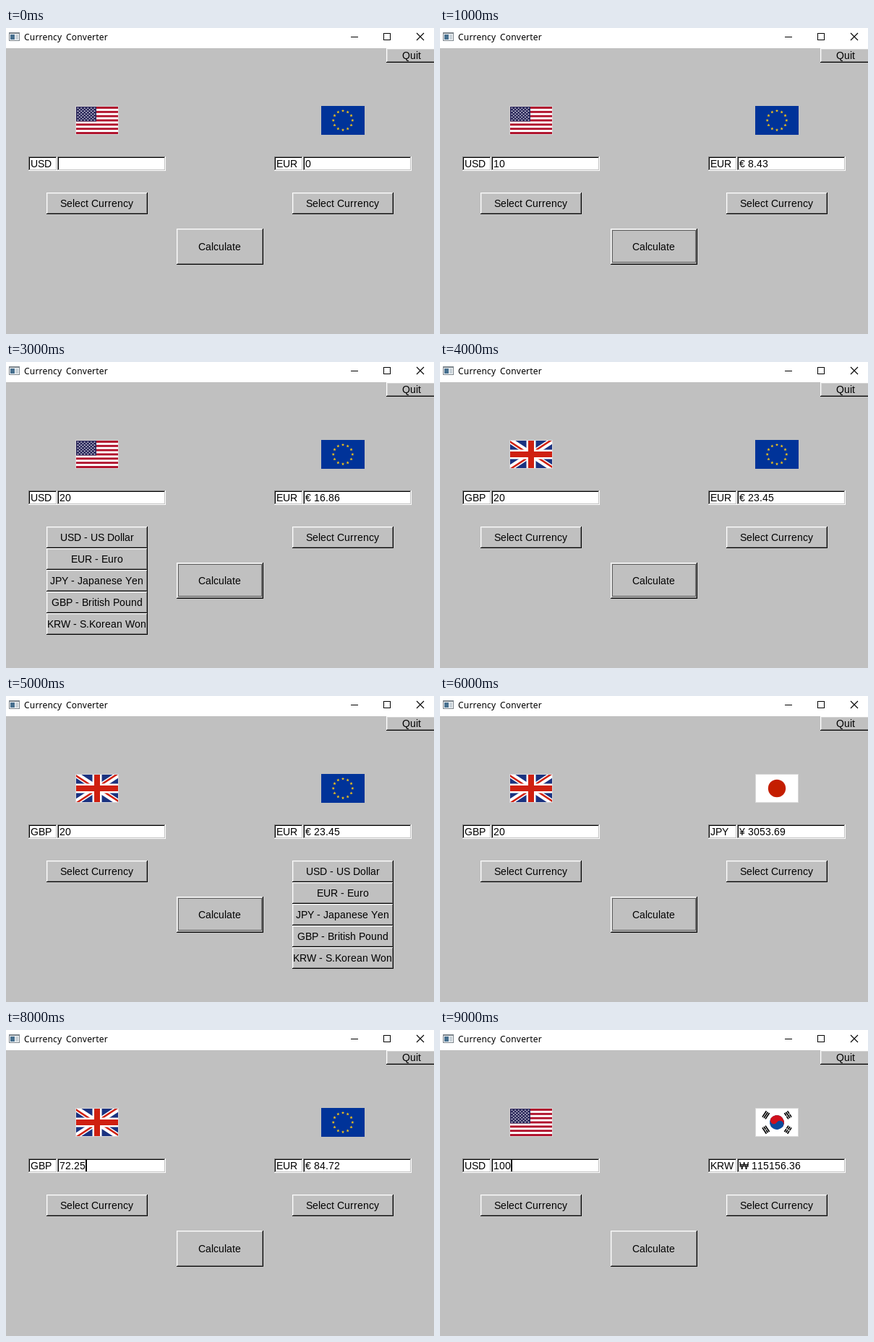
Write an HTML page with a canvas that moves like this. It is 592 by 424 pixels and loops after 10000 ms.

```html
<!DOCTYPE html>
<html lang="en">
<head>
<meta charset="utf-8">
<title>Currency Converter</title>
<style>
html, body { margin: 0; width: 100%; height: 100%; overflow: hidden; background: #c0c0c0; }
canvas { display: block; }
</style>
</head>
<body>
<canvas id="stage" width="592" height="424"></canvas>
<script>
const ctx = document.getElementById('stage').getContext('2d');
const UI_FONT = '14px "Liberation Sans", Arial, sans-serif';
const MENU = ['USD - US Dollar', 'EUR - Euro', 'JPY - Japanese Yen', 'GBP - British Pound', 'KRW - S.Korean Won'];
const STEP = 1000;

// One state per second.
const STATES = [
  { from: 'USD', amount: '', to: 'EUR', result: '0' },
  { from: 'USD', amount: '10', to: 'EUR', result: '€ 8.43', focus: true },
  { from: 'USD', amount: '20', to: 'EUR', result: '€ 16.86', focus: true },
  { from: 'USD', amount: '20', to: 'EUR', result: '€ 16.86', focus: true, menu: 'left' },
  { from: 'GBP', amount: '20', to: 'EUR', result: '€ 23.45', focus: true },
  { from: 'GBP', amount: '20', to: 'EUR', result: '€ 23.45', focus: true, menu: 'right' },
  { from: 'GBP', amount: '20', to: 'JPY', result: '¥ 3053.69', focus: true },
  { from: 'JPY', amount: '100', to: 'KRW', result: '₩ 1049.07', caret: true },
  { from: 'GBP', amount: '72.25', to: 'EUR', result: '€ 84.72', caret: true },
  { from: 'USD', amount: '100', to: 'KRW', result: '₩ 115156.36', caret: true }
];

function rect(x, y, w, h, color) {
  ctx.fillStyle = color;
  ctx.fillRect(x, y, w, h);
}

function disc(x, y, r, color, start = 0, end = Math.PI * 2) {
  ctx.fillStyle = color;
  ctx.beginPath();
  ctx.arc(x, y, r, start, end);
  ctx.fill();
}

function line(x1, y1, x2, y2, width, color) {
  ctx.strokeStyle = color;
  ctx.lineWidth = width;
  ctx.beginPath();
  ctx.moveTo(x1, y1);
  ctx.lineTo(x2, y2);
  ctx.stroke();
}

// Text advances by whole pixels per glyph, like classic desktop widgets.
const advance = ch => Math.round(ctx.measureText(ch).width);

function textWidth(str) {
  ctx.font = UI_FONT;
  return [...str].reduce((sum, ch) => sum + advance(ch), 0);
}

function label(str, x, y) {
  ctx.font = UI_FONT;
  ctx.fillStyle = '#000';
  for (const ch of str) {
    ctx.fillText(ch, x, y);
    x += advance(ch);
  }
  return x;
}

function bevel(x, y, w, h, light, dark) {
  rect(x, y, w, 1, light);
  rect(x, y, 1, h, light);
  rect(x, y + h - 1, w, 1, dark);
  rect(x + w - 1, y, 1, h, dark);
}

function button(str, x, y, w, h) {
  rect(x, y, w, h, '#c0c0c0');
  bevel(x + 1, y + 1, w - 2, h - 2, '#d4d4d4', '#808080');
  bevel(x, y, w, h, '#fff', '#000');
  label(str, Math.floor(x + (w - textWidth(str)) / 2), y + h / 2 + 5);
}

function field(str, x, w, caret) {
  rect(x, 178, w, 20, '#fff');
  bevel(x, 178, w, 20, '#808080', '#fff');
  bevel(x + 1, 179, w - 2, 18, '#000', '#c0c0c0');
  const end = label(str, x + 3, 193);
  if (caret) rect(end, 180, 2, 16, '#000');
}

// Flags are drawn around their centre, in a 60 by 40 box.
const FLAGS = {
  USD() {
    rect(-30, -20, 60, 40, '#d6d0d2');
    rect(-29, -19, 58, 38, '#fff');
    const h = 38 / 13;
    for (let i = 0; i < 13; i += 2) rect(-29, -19 + i * h, 58, h, '#b0122c');
    rect(-29, -19, 28, h * 7, '#2d2a5c');
    for (let row = 0; row < 9; row++) {
      for (let col = row % 2; col < 11; col += 2) {
        disc(-26.5 + col * 2.3, -17 + row * 2.07, 0.85, '#e4e4f0');
      }
    }
  },
  EUR() {
    rect(-30, -20, 60, 40, '#003399');
    for (let i = 0; i < 12; i++) {
      const a = i * Math.PI / 6;
      star(13.3 * Math.sin(a), -13.3 * Math.cos(a), 2.3, '#f5c518');
    }
  },
  GBP() {
    const w = 29, h = 19;
    rect(-30, -20, 60, 40, '#d4d4d8');
    ctx.beginPath();
    ctx.rect(-w, -h, w * 2, h * 2);
    ctx.clip();
    rect(-w, -h, w * 2, h * 2, '#1a3280');
    const cross = (width, color) => {
      line(-w, -h, w, h, width, color);
      line(-w, h, w, -h, width, color);
    };
    cross(8, '#fff');
    ctx.save();
    ctx.beginPath();
    for (const [x1, y1, x2, y2] of [[w, 0, w, h], [0, h, -w, h], [-w, 0, -w, -h], [0, -h, w, -h]]) {
      ctx.moveTo(0, 0);
      ctx.lineTo(x1, y1);
      ctx.lineTo(x2, y2);
      ctx.closePath();
    }
    ctx.clip();
    cross(5, '#cf2010');
    ctx.restore();
    rect(-w, -6.5, w * 2, 13, '#fff');
    rect(-6.5, -h, 13, h * 2, '#fff');
    rect(-w, -4, w * 2, 8, '#cf2010');
    rect(-4, -h, 8, h * 2, '#cf2010');
  },
  JPY() {
    rect(-30, -20, 60, 40, '#d8d8d8');
    rect(-29, -19, 58, 38, '#fff');
    disc(0, 0, 12.2, '#c41e00');
  },
  KRW() {
    rect(-30, -20, 60, 40, '#d8d8d8');
    rect(-29, -19, 58, 38, '#fff');
    const tilt = Math.atan2(2, 3), red = '#d0101c', blue = '#0b4a9c';
    ctx.save();
    ctx.rotate(tilt);
    disc(0, 0, 10, blue);
    disc(0, 0, 10, red, Math.PI, Math.PI * 2);
    disc(-5, 0, 5, red);
    disc(5, 0, 5, blue);
    ctx.restore();
    // Bars from the outside in; 1 marks a broken bar.
    trigram(tilt + Math.PI, [0, 0, 0]);
    trigram(-tilt, [1, 0, 1]);
    trigram(Math.PI - tilt, [0, 1, 0]);
    trigram(tilt, [1, 1, 1]);
  }
};

function star(x, y, r, color) {
  ctx.fillStyle = color;
  ctx.beginPath();
  for (let i = 0; i < 10; i++) {
    const a = i * Math.PI / 5, d = i % 2 ? r * 0.4 : r;
    ctx.lineTo(x + d * Math.sin(a), y - d * Math.cos(a));
  }
  ctx.fill();
}

function trigram(angle, bars) {
  ctx.save();
  ctx.rotate(angle);
  bars.forEach((broken, i) => {
    const x = 20 - i * 2.5;
    rect(x, -5, 1.67, 10, '#000');
    if (broken) rect(x - 0.2, -0.45, 2.07, 0.9, '#fff');
  });
  ctx.restore();
}

function flag(code, x) {
  ctx.save();
  ctx.translate(x, 128);
  FLAGS[code]();
  ctx.restore();
}

function titleBar() {
  rect(0, 0, 592, 28, '#fff');
  rect(4, 6, 15, 12, '#7c858c');
  rect(5, 8, 13, 9, '#f4f6f8');
  rect(6, 9, 6, 7, '#47708f');
  rect(13, 9, 4, 7, '#c9d2d8');
  ctx.font = '12px "Noto Sans", "Open Sans", sans-serif';
  ctx.letterSpacing = '0.2px';
  ctx.fillStyle = '#000';
  ctx.fillText('Currency', 25, 17);
  ctx.fillText('Converter', 83, 17);
  ctx.letterSpacing = '0px';
  rect(477, 12, 10, 1, '#000');
  ctx.strokeStyle = '#000';
  ctx.lineWidth = 1;
  ctx.strokeRect(522.5, 7.5, 9, 9);
  line(568, 7, 578, 17, 1.1, '#000');
  line(578, 7, 568, 17, 1.1, '#000');
}

function picker(x, open) {
  const items = open ? MENU : ['Select Currency'];
  items.forEach((item, i) => button(item, x, 228 + i * 30, 140, 30));
}

function draw(state) {
  rect(0, 0, 592, 424, '#c0c0c0');
  titleBar();
  button('Quit', 526, 28, 70, 20);
  flag(state.from, 126);
  flag(state.to, 466);
  field(state.from, 31, 40);
  field(state.amount, 71, 150, state.caret);
  field(state.to, 371, 40);
  field(state.result, 411, 150);
  picker(56, state.menu === 'left');
  picker(396, state.menu === 'right');
  button('Calculate', 236, 278, 120, 50);
  if (state.focus) {
    ctx.strokeStyle = '#000';
    ctx.lineWidth = 1;
    ctx.setLineDash([1, 1]);
    ctx.strokeRect(238.5, 280.5, 115, 44);
    ctx.setLineDash([]);
  }
}

const start = performance.now();
function tick() {
  const elapsed = performance.now() - start;
  draw(STATES[Math.floor(elapsed / STEP) % STATES.length]);
  requestAnimationFrame(tick);
}
tick();
</script>
</body>
</html>
```
